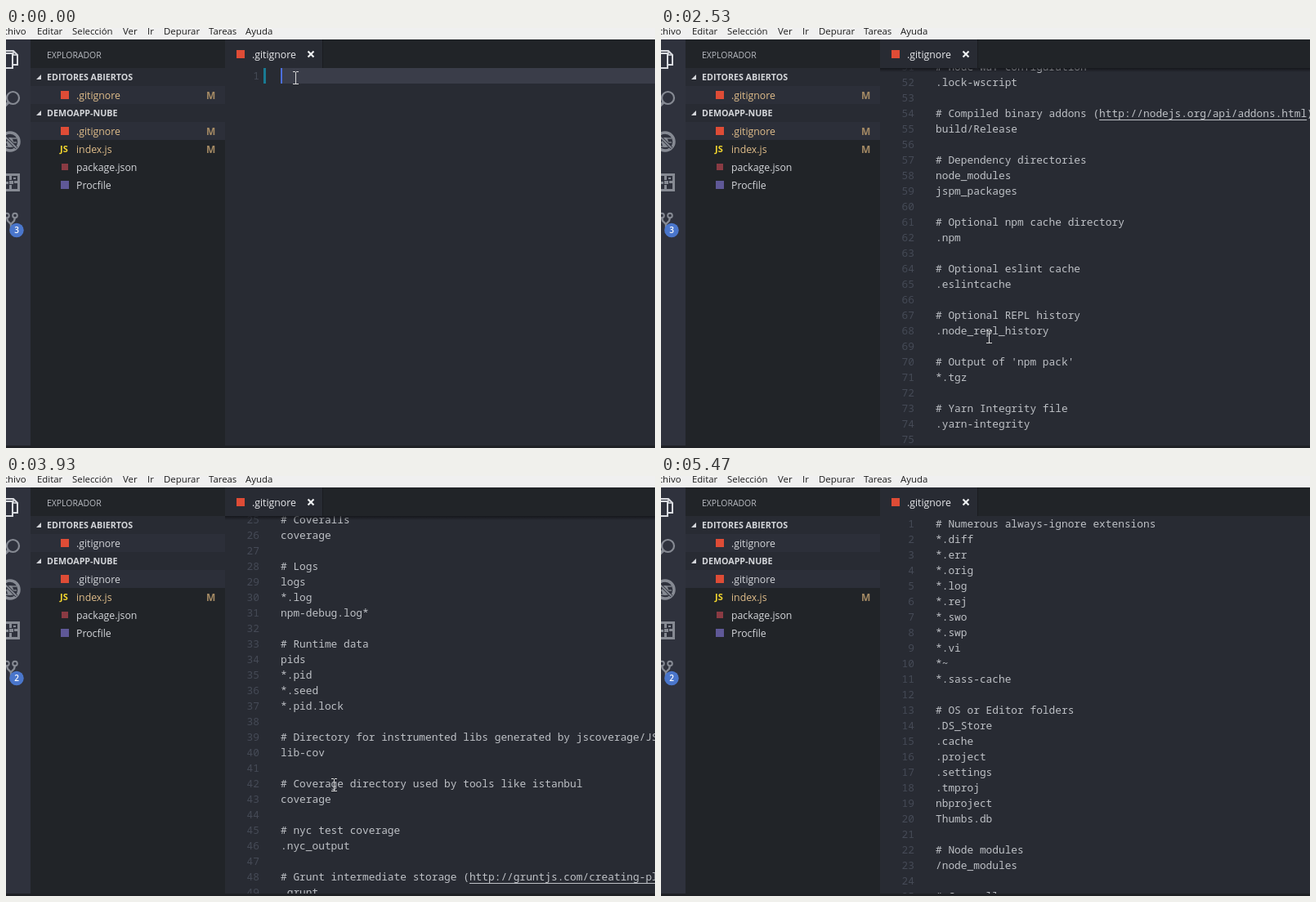
An HTML page with a canvas that plays this animation: 794 px wide and 514 px high, repeating every 6590 ms.

```html
<!DOCTYPE html>
<html lang="es">
<head>
<meta charset="utf-8">
<title>Editor</title>
<style>
html, body { margin: 0; width: 100%; height: 100%; overflow: hidden; background: #282b33; }
canvas { display: block; width: 794px; height: 514px; }
</style>
</head>
<body>
<canvas id="stage"></canvas>
<script>
const W = 794, H = 514, LOOP = 6590, STEP = 200 / 3;
const TOP = 49, LINE = 19, TEXT_X = 336;
const UI = '"Open Sans", "Noto Sans", sans-serif';
const MONO = '12.83px "Noto Sans Mono", "DejaVu Sans Mono", monospace';
const PASTE = 930, LINKS = 1800, SAVE = 1870, COMMIT = 3930;

const C = {
  menu: '#f0f0f0', side: '#212428', editor: '#282b33', activity: '#2f323d',
  row: '#2c2f39', line: '#3a3d49', number: '#454a56', code: '#bec1c6',
  text: '#d4d6da', changed: '#e0bd8a', mark: '#a48a64', icon: '#868a93',
  badge: '#4a76cb', gutter: '#197a93', caret: '#4c6fdc', git: '#de4c36'
};

const FILE = `# Numerous always-ignore extensions
*.diff
*.err
*.orig
*.log
*.rej
*.swo
*.swp
*.vi
*~
*.sass-cache

# OS or Editor folders
.DS_Store
.cache
.project
.settings
.tmproj
nbproject
Thumbs.db

# Node modules
/node_modules

# Coveralls
coverage

# Logs
logs
*.log
npm-debug.log*

# Runtime data
pids
*.pid
*.seed
*.pid.lock

# Directory for instrumented libs generated by jscoverage/JSCover
lib-cov

# Coverage directory used by tools like istanbul
coverage

# nyc test coverage
.nyc_output

# Grunt intermediate storage (http://gruntjs.com/creating-plugins#storing-task-files)
.grunt

# node-waf configuration
.lock-wscript

# Compiled binary addons (http://nodejs.org/api/addons.html)
build/Release

# Dependency directories
node_modules
jspm_packages

# Optional npm cache directory
.npm

# Optional eslint cache
.eslintcache

# Optional REPL history
.node_repl_history

# Output of 'npm pack'
*.tgz

# Yarn Integrity file
.yarn-integrity

# Heroku Env
.env
`.split('\n');

// [time, scroll offset]
const SCROLL = [
  [0, 0], [PASTE, 861], [2400, 911], [2530, 961], [2800, 1011], [2870, 1061],
  [3330, 1011], [3400, 961], [3670, 761], [3730, 661], [3870, 561], [3930, 461],
  [4000, 361], [4070, 311], [4270, 211], [4330, 111], [4530, 0]
];

// [time, x, y] of the mouse pointer
const POINTER = [
  [0, 354, 61], [70, 354, 61], [130, 352, 60], [1000, 352, 60], [1670, 397, 272],
  [2000, 400, 280], [2070, 400, 280], [2330, 401, 378], [5000, 401, 378], [5470, 345, 530]
];

const canvas = document.getElementById('stage');
const ctx = canvas.getContext('2d');
const ratio = window.devicePixelRatio || 1;
canvas.width = W * ratio;
canvas.height = H * ratio;
ctx.scale(ratio, ratio);

function rect(x, y, w, h, color) {
  ctx.fillStyle = color;
  ctx.fillRect(x, y, w, h);
}

function text(str, x, y, font, color, align = 'left') {
  ctx.font = font;
  ctx.fillStyle = color;
  ctx.textAlign = align;
  ctx.fillText(str, x, y);
}

function ui(str, x, y, color, size = 12.3, weight = 400) {
  text(str, x, y, `${weight} ${size}px ${UI}`, color);
}

function dot(x, y, r, color) {
  ctx.fillStyle = color;
  ctx.beginPath();
  ctx.arc(x, y, r, 0, Math.PI * 2);
  ctx.fill();
}

function ring(x, y, r) {
  ctx.beginPath();
  ctx.arc(x, y, r, 0, Math.PI * 2);
  ctx.stroke();
}

function path(points, color, width) {
  ctx.beginPath();
  points.forEach(([x, y], i) => i ? ctx.lineTo(x, y) : ctx.moveTo(x, y));
  ctx.strokeStyle = color;
  ctx.lineWidth = width;
  ctx.stroke();
}

function square(x, y, size, color) {
  rect(x - size / 2, y - size / 2, size, size, color);
}

function scrollAt(t) {
  return SCROLL.filter(([at]) => at <= t).pop()[1];
}

function pointerAt(t) {
  const i = POINTER.findIndex(([at]) => at > t);
  if (i < 0) return null;
  const [t0, x0, y0] = POINTER[i - 1], [t1, x1, y1] = POINTER[i];
  const k = (t - t0) / (t1 - t0), e = k * k * (3 - 2 * k);
  return [x0 + (x1 - x0) * e, y0 + (y1 - y0) * e];
}

function drawMenu() {
  rect(0, 0, W, 14, C.menu);
  const items = [['Archivo', -15], ['Editar', 38], ['Selección', 81], ['Ver', 143],
    ['Ir', 173], ['Depurar', 193], ['Tareas', 248], ['Ayuda', 293]];
  for (const [label, x] of items) ui(label, x, 8, '#1b1b1b', 11.4);
}

function drawActivity(count) {
  rect(0, 14, 30, H - 14, C.activity);

  // files
  path([[-4, 31], [8, 31], [8, 49], [-4, 49]], '#d9dbe0', 2);
  path([[0, 28], [9, 28], [14, 33], [14, 45], [9, 45]], '#d9dbe0', 2);
  path([[9, 28], [9, 33], [14, 33]], '#d9dbe0', 1.5);

  // search
  ctx.strokeStyle = C.icon;
  ctx.lineWidth = 2.2;
  ring(8.5, 85.5, 7.5);
  path([[3, 91], [-4, 98]], C.icon, 3.5);

  // debug
  ring(5, 139, 11);
  ctx.fillStyle = C.icon;
  ctx.beginPath();
  ctx.ellipse(5, 140, 4, 6, 0, 0, Math.PI * 2);
  ctx.fill();
  for (const y of [135, 140, 145]) path([[-3, y], [13, y]], C.icon, 1.4);
  path([[-3, 131], [13, 147]], C.activity, 3.5);
  path([[-3, 131], [13, 147]], C.icon, 1.8);

  // extensions
  rect(0, 178, 17, 22, C.icon);
  rect(7, 181, 7, 6, C.activity);
  rect(9, 183, 3, 2, C.icon);
  rect(0, 181, 4, 7, C.activity);
  rect(0, 191, 4, 6, C.activity);
  rect(7, 190, 7, 7, C.activity);
  rect(3, 186, 7, 6, C.activity);
  rect(4, 187, 5, 4, C.icon);

  // source control
  ctx.strokeStyle = C.icon;
  ctx.lineWidth = 2;
  ring(1, 229.5, 2.8);
  ring(11, 229.5, 2.8);
  path([[1, 232], [2, 236], [6, 240], [10, 236], [11, 232]], C.icon, 2.4);
  path([[6, 240], [6, 251]], C.icon, 2.4);
  dot(13, 247.5, 8.7, C.badge);
  text(count, 13, 251.3, `600 10px ${UI}`, '#fff', 'center');
}

function sectionHeader(label, y) {
  rect(30, y, 238, 22, C.editor);
  ctx.fillStyle = C.text;
  ctx.beginPath();
  ctx.moveTo(43, y + 8);
  ctx.lineTo(43, y + 14);
  ctx.lineTo(37, y + 14);
  ctx.fill();
  ui(label, 50, y + 15, C.text, 10.7, 700);
}

function fileRow(name, y, changed, active) {
  if (active) rect(30, y, 238, 22, C.row);
  ui(name, 86, y + 15.5, changed ? C.changed : C.text);
  if (changed) ui('M', 245, y + 15.5, C.mark, 12, 700);
}

function drawSidebar(dirty, committed) {
  rect(30, 14, 238, H - 14, C.side);
  ui('EXPLORADOR', 50, 37, '#b9bcc2', 10.45);
  sectionHeader('EDITORES ABIERTOS', 49);
  fileRow('.gitignore', 71, !committed, true);
  sectionHeader('DEMOAPP-NUBE', 93);
  fileRow('.gitignore', 115, !committed, true);
  fileRow('index.js', 137, true, false);
  fileRow('package.json', 159, false, false);
  fileRow('Procfile', 181, false, false);
  if (dirty) dot(56, 82, 4, '#b3b6bb');
  square(72, 82, 10, C.git);
  square(72, 126, 10, C.git);
  ui('JS', 66, 152, '#f2d62e', 11, 700);
  square(72, 170, 8, '#8a3b43');
  square(72, 192, 10, '#5f5897');
}

function drawTabs(dirty) {
  rect(268, 14, W - 268, 35, C.side);
  rect(268, 14, 119, 35, C.editor);
  rect(387, 14, 1, 35, '#1a1c20');
  square(287, 32, 10, C.git);
  ui('.gitignore', 301, 37, '#e8e9ec');
  if (dirty) {
    dot(373, 32, 4.2, '#a8abb1');
  } else {
    path([[369.5, 28.5], [376.5, 35.5]], '#eceef0', 2.2);
    path([[376.5, 28.5], [369.5, 35.5]], '#eceef0', 2.2);
  }
}

function drawLine(str, i, y, links) {
  text(i + 1, 310, y + 14, MONO, C.number, 'right');
  text(str, TEXT_X, y + 14, MONO, C.code);
  const url = links && str.match(/http[^)]*/);
  if (url) {
    const x = TEXT_X + ctx.measureText(str.slice(0, url.index)).width;
    rect(x, y + 17, ctx.measureText(url[0]).width, 1, C.code);
  }
}

function drawEditor(t) {
  const lines = t < PASTE ? [''] : FILE;
  const scroll = scrollAt(t);
  rect(268, TOP, W - 268, H - TOP, C.editor);
  ctx.save();
  ctx.beginPath();
  ctx.rect(268, TOP, W - 268, H - TOP);
  ctx.clip();

  const caretY = TOP + (lines.length - 1) * LINE - scroll;
  rect(TEXT_X, caretY, W - TEXT_X, LINE, C.line);
  if (t < 130 || t >= 670) rect(TEXT_X, caretY, 2, LINE, C.caret);

  if (t < SAVE) rect(315, TOP, 3, t < PASTE ? LINE : H - TOP, C.gutter);
  lines.forEach((str, i) => {
    const y = TOP + i * LINE - scroll;
    if (y > TOP - LINE && y < H) drawLine(str, i, y, t >= LINKS);
  });

  if (scroll > 0) {
    const shade = ctx.createLinearGradient(0, TOP, 0, TOP + 5);
    shade.addColorStop(0, 'rgba(15,16,20,.75)');
    shade.addColorStop(1, 'rgba(15,16,20,0)');
    rect(268, TOP, W - 268, 5, shade);
  }
  ctx.restore();
}

function drawPointer(t) {
  const p = pointerAt(t);
  if (!p) return;
  const x = Math.round(p[0]), y = Math.round(p[1]);
  const color = '#d8d8d8';
  rect(x, y - 7, 1, 15, color);
  for (const edge of [y - 8, y + 7]) {
    rect(x - 3, edge, 3, 1, color);
    rect(x + 1, edge, 3, 1, color);
  }
}

function draw(now) {
  const elapsed = now % LOOP;
  const t = Math.floor((elapsed + 4) / STEP) * STEP + 4;
  const dirty = t >= PASTE && t < SAVE;
  const committed = t >= COMMIT;
  drawEditor(t);
  drawTabs(dirty);
  drawSidebar(dirty, committed);
  drawActivity(committed ? '2' : '3');
  drawMenu();
  drawPointer(t);
  rect(0, 511, W, 3, '#1f2125');
}

const start = performance.now();
function tick() {
  draw(performance.now() - start);
  requestAnimationFrame(tick);
}
tick();
</script>
</body>
</html>
```
